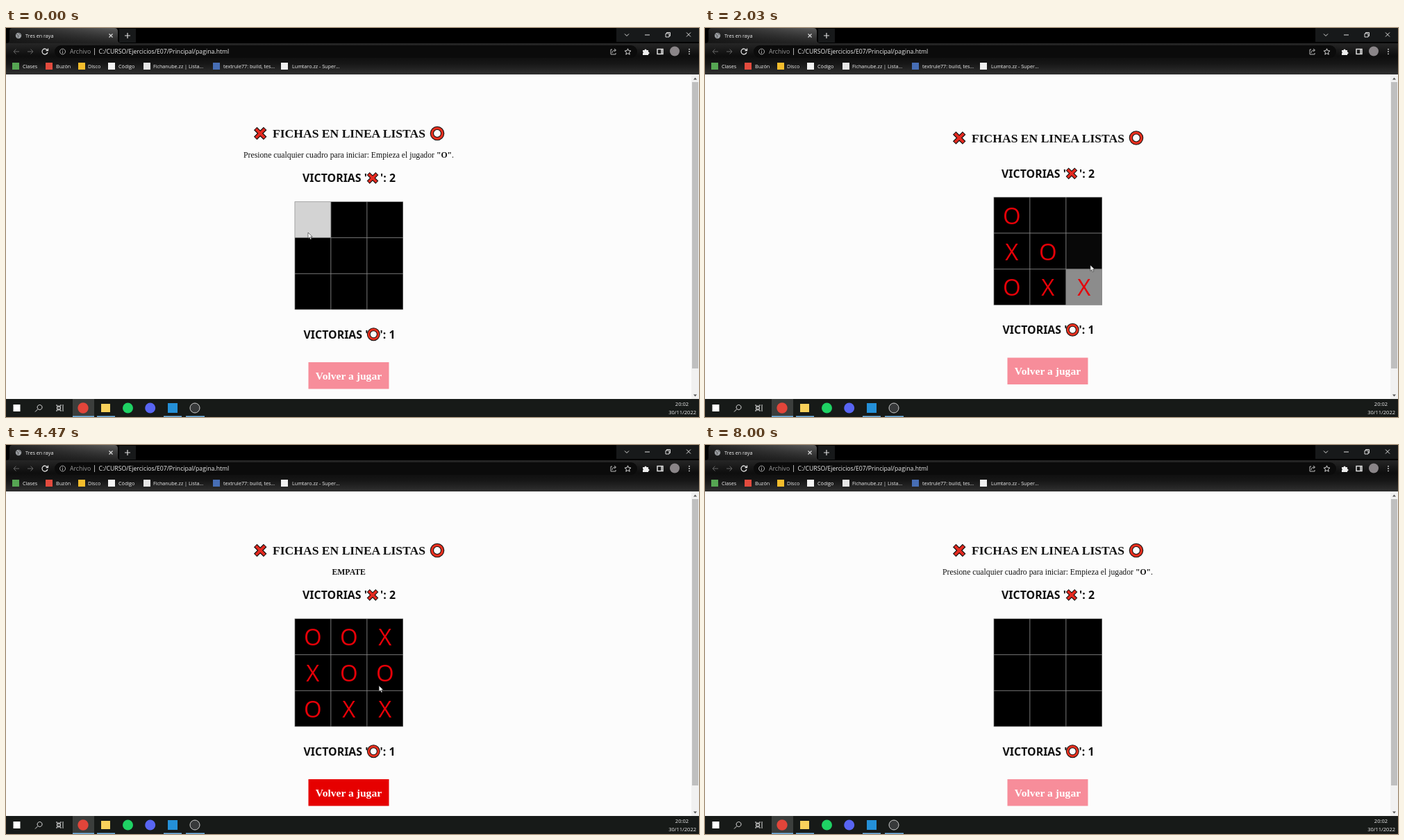
Write an HTML page that moves like this. It is 998 by 561 pixels and loops after 8.03 s.

```html
<!DOCTYPE html>
<html lang="es">
<head>
<meta charset="utf-8">
<title>Tres en raya</title>
<style>
html, body { margin: 0; width: 100%; height: 100%; overflow: hidden; background: #fcfcfc }
svg { display: block; width: 998px; height: 561px }
text { white-space: pre }
.ui { font: 7.2px "Open Sans", "Noto Sans", sans-serif; fill: #eee }
.line { fill: none; stroke: #ddd }
.serif { font: 11.72px "Liberation Serif", serif; fill: #111; text-anchor: middle }
.bold { font-weight: 700 }
.score { font: 700 15.9px "Noto Sans", "Open Sans", sans-serif; fill: #111 }
#board text { font: 33px "Open Sans", "Noto Sans", sans-serif; fill: #e60008; text-anchor: middle }
</style>
</head>
<body>
<svg viewBox="0 0 998 561">
  <defs>
    <linearGradient id="tab"><stop stop-color="#242424"/><stop offset="1" stop-color="#5c5c5c"/></linearGradient>
    <linearGradient id="tabShade" x2="0" y2="1"><stop stop-color="#000" stop-opacity="0"/><stop offset="1" stop-color="#111" stop-opacity=".75"/></linearGradient>
    <linearGradient id="bar" x2="0" y2="1"><stop stop-color="#262626"/><stop offset=".4" stop-color="#0e0e0e"/><stop offset=".65" stop-color="#161616"/><stop offset="1" stop-color="#303030"/></linearGradient>
    <g id="cross" fill="none">
      <path d="M-7-7 7 7M7-7-7 7" stroke="#111" stroke-width="6.4"/>
      <path d="M-6.3-6.3 6.3 6.3M6.3-6.3-6.3 6.3" stroke="#e52a20" stroke-width="4"/>
    </g>
    <g id="ring" fill="none">
      <circle r="7.6" stroke="#111" stroke-width="5.4"/>
      <circle r="7.6" stroke="#e8301f" stroke-width="3.2"/>
    </g>
  </defs>

  <!-- page -->
  <path fill="#fcfcfc" d="M0 67h988v468H0z"/>
  <path fill="#f1f1f1" d="M987 67h11v468h-11z"/>
  <path fill="#bfbfbf" d="M988 78h9v413h-9z"/>
  <path fill="#555" d="M990 74.5l2.5-3 2.5 3zM990 528.5l2.5 3 2.5-3z"/>

  <g id="head">
    <use href="#cross" x="366.2" y="152"/>
    <text class="serif bold" x="494" y="158" style="font-size:17.58px">FICHAS EN LINEA LISTAS</text>
    <use href="#ring" x="621" y="152"/>
  </g>
  <text id="start" class="serif" x="493.5" y="187">Presione cualquier cuadro para iniciar: Empieza el jugador <tspan class="bold">"O"</tspan>.</text>
  <text id="draw" class="serif bold" x="493.7" y="187">EMPATE</text>
  <g id="game">
    <g class="score">
      <text x="427" y="222">VICTORIAS '</text>
      <text x="561" y="222" text-anchor="end">': 2</text>
      <text x="428.5" y="447.5">VICTORIAS '</text>
      <text x="560.5" y="447.5" text-anchor="end">': 1</text>
    </g>
    <use href="#cross" transform="translate(528 216.3) scale(.9)"/>
    <use href="#ring" transform="translate(529.3 441.7) scale(.92)"/>
    <g id="board"><path fill="#858585" d="M415.6 250.2h156.4v156h-156.4z"/></g>
    <path id="button" d="M435.5 482h116v38.5h-116z"/>
    <text class="serif bold" x="493.5" y="506.7" style="font-size:15.6px;fill:#fff">Volver a jugar</text>
  </g>

  <!-- browser -->
  <path d="M0 0h998v67H0z"/>
  <path fill="url(#bar)" d="M0 22h998v45H0z"/>
  <path id="tabShape" fill="url(#tab)" d="M1 22q4 0 4-4V5q0-5 5-5h146q5 0 5 5v13q0 4 4 4z"/>
  <path fill="url(#tabShade)" d="M1 22q4 0 4-4V5q0-5 5-5h146q5 0 5 5v13q0 4 4 4z"/>
  <rect x="70" y="25" width="839" height="18" rx="9" fill="#0b0b0b"/>
  <circle cx="18" cy="11" r="4.2" fill="#9a9da1"/>
  <path class="line" style="stroke:#555" d="M15 9l3 2-1 3M18 7l3 3"/>
  <path fill="#17191a" d="M163 1h24v20h-24zM879 0h119v20H879z"/>
  <g class="line">
    <path stroke-width="1.2" d="M148.500 8.500l5 5m0-5l-5 5M171 11h8m-4-4v8"/>
    <path d="M891 8.500l3 3 3-3M920 10h7M980 6.500l6 6m0-6l-6 6M950 8h5v5h-5zM951.500 8V6.500h5v5H955"/>
    <path stroke="#666" d="M19 34h-8m3.500-3.500L11 34l3.500 3.500M31 34h8m-3.500-3.500L39 34l-3.500 3.500"/>
    <path stroke-width="1.3" d="M59.500 32a4 4 0 1 0 .4 3M60.500 29.500v3h-3"/>
    <path stroke="#aaa" d="M81.500 30a4 4 0 1 0 .1 0M81.500 33.500v3M81.500 31.500v1M127.500 29v10"/>
    <path stroke="#bbb" d="M873 31h-2v7h7v-2M873 36q0-4 5-4m-2-2l2.500 2-2.500 2"/>
    <path d="M895.500 29.800l1.200 2.900 3.200.3-2.400 2.100.7 3.100-2.700-1.600-2.700 1.600.7-3.100-2.400-2.100 3.200-.3z"/>
    <path stroke-width="1.500" d="M938 30.500h8v7h-8zM944 31v6"/>
  </g>
  <path fill="#eee" d="M917 32h2.500a1.500 1.500 0 0 1 3 0h2.500v2.500a1.500 1.500 0 0 1 0 3V39h-8v-2.500a1.500 1.500 0 0 0 0-2.500z"/>
  <circle cx="963" cy="33.500" r="7" fill="#8a8588"/>
  <path stroke="#ddd" stroke-width="1.800" stroke-linecap="round" stroke-dasharray="0 3.300" d="M984 30.700v7"/>
  <g class="ui">
    <text x="28" y="13.500">Tres en raya</text>
    <g style="font-size:8.7px"><text x="92" y="37.200" fill="#999">Archivo</text><text x="133.500" y="37.200">C:/CURSO/Ejercicios/E07/Principal/pagina.html</text></g>
    <g id="marks"></g>
  </g>

  <!-- taskbar -->
  <path fill="#171a18" d="M0 535h998v26H0z"/>
  <path fill="#3b3e3c" d="M96 535h31v26H96z"/>
  <path fill="#76b9ed" d="M96 559.500h31v1.500H96zM131 559.500h26v1.500h-26zM227 559.500h26v1.500h-26zM259 559.500h27v1.500h-27z"/>
  <path fill="#fff" d="M10.500 543h10v10h-10z"/>
  <path class="line" d="M48.500 543.500a3.500 3.500 0 1 0 .1 0M46 549.500l-4 4M73 543v2h6v-2M73 553v-2h6v2M73.500 546.500h5v3h-5zM82 543v10"/>
  <circle cx="111" cy="548" r="7.700" fill="#e2453a"/>
  <path fill="#f8d15b" d="M137 542h13v12h-13z"/>
  <circle cx="175.500" cy="548" r="7.500" fill="#1fd264"/>
  <circle cx="207.700" cy="548" r="7.500" fill="#5865f2"/>
  <path fill="#2490d8" d="M233 541h14v14h-14z"/>
  <circle cx="272" cy="548" r="7" fill="#37393a" stroke="#ccc"/>
  <g class="ui" style="font-size:7.5px" text-anchor="end">
    <text x="983" y="544.500">20:02</text><text x="994" y="556.500">30/11/2022</text>
  </g>

  <g id="pointer" fill="#fff" stroke="#222" stroke-width=".6">
    <path id="arrow" d="M0 0v8.500l2-1.800 1.400 3.200 1.500-.6-1.400-3.200h2.700z"/>
    <path id="hand" d="M-1 1q1-2 2 0v3l4 1q1.500.5 1 2.500l-1 4h-5l-3-4.500q0-1.500 2 0z"/>
  </g>
</svg>
<script>
const $ = id => document.getElementById(id);
const LOOP = 8030, FADE = 300, SHIFT = 6.5;
const FIRST = 200, LAST = 3130, RESET = 5900;

// [time, cell], O and X taking turns
const moves = [[FIRST, 0], [520, 3], [840, 4], [1380, 7], [1600, 6], [1900, 8], [2260, 5], [2580, 2], [LAST, 1]];

// [time, x, y] of the pointer tip
const path = [
  [0, 435, 295], [260, 437, 290], [480, 443, 318], [560, 445, 320], [800, 490, 318], [870, 492, 314],
  [1030, 499, 273], [1200, 498, 288], [1330, 490, 368], [1400, 488, 370], [1560, 445, 372], [1640, 447, 372],
  [1850, 540, 370], [1940, 549, 369], [2030, 555, 342], [2200, 548, 322], [2330, 547, 318], [2520, 538, 275],
  [2770, 534, 289], [2900, 536, 285], [3080, 500, 278], [3200, 500, 278], [3570, 535, 323], [4300, 536, 326],
  [4900, 540, 400], [5300, 552, 495], [5500, 549, 498], [6200, 549, 498], [6900, 620, 600], [LOOP, 620, 600]
];

const marks = [
  [9, "#56a653", "Clases", 24], [57, "#e34b3e", "Buzón", 72], [104, "#f4bd2c", "Disco", 118],
  [147, "#f4f4f4", "Código", 162], [198, "#e6e6e6", "Fichanube.zz | Lista...", 212],
  [298, "#476eb5", "textrule77: build, tes...", 313], [396, "#f0f0f0", "Lumtaro.zz - Super...", 412]
];
$("marks").innerHTML = marks.map(([x, color, name, tx]) =>
  `<rect x="${x}" y="50" width="10" height="10" fill="${color}"/><text x="${tx}" y="57.7">${name}</text>`).join("");

const cells = [...Array(9).keys()].map(i => {
  const g = document.createElementNS("http://www.w3.org/2000/svg", "g");
  g.setAttribute("transform", `translate(${416.3 + i % 3 * 52} ${250.9 + (i / 3 | 0) * 51.9})`);
  g.innerHTML = '<rect width="51.1" height="51"/><text x="25.5" y="38.3"></text>';
  $("board").append(g);
  return g.children;
});

const playing = t => t >= FIRST && t < LAST;

function pointerAt(t) {
  const i = path.findIndex(p => p[0] > t);
  const [t0, x0, y0] = path[i - 1], [t1, x1, y1] = path[i];
  const k = (t - t0) / (t1 - t0);
  return [x0 + (x1 - x0) * k, y0 + (y1 - y0) * k];
}

function hoveredAt(t) {
  if (t >= LAST && t < RESET) return -1;
  const [x, y] = pointerAt(t);
  const col = Math.floor((x - 416) / 52);
  const row = Math.floor((y - 250.5 + (playing(t) ? SHIFT : 0)) / 52);
  return col >= 0 && col < 3 && row >= 0 && row < 3 ? row * 3 + col : -1;
}

// Each cell brightens while hovered and darkens afterwards.
function glowAt(t) {
  const glow = Array(9).fill(0), step = 10;
  glow[0] = 1;
  for (let s = 0; s < t; s += step) {
    const over = hoveredAt(s), d = Math.min(step, t - s) / FADE;
    for (let i = 0; i < 9; i++) glow[i] = Math.max(0, Math.min(1, glow[i] + (i === over ? d : -d)));
  }
  return glow;
}

function render(t) {
  const active = playing(t), over = t >= LAST && t < RESET;
  $("head").setAttribute("transform", `translate(0 ${active ? SHIFT : 0})`);
  $("game").setAttribute("transform", `translate(0 ${active ? -SHIFT : 0})`);
  $("start").style.display = active || over ? "none" : "";
  $("draw").style.display = over ? "" : "none";
  $("button").setAttribute("fill", over ? "#e60000" : "#f78d9a");

  const glow = glowAt(t);
  cells.forEach(([rect, label], i) => {
    const v = Math.round(211 * glow[i]);
    rect.setAttribute("fill", `rgb(${v},${v},${v})`);
    const turn = moves.findIndex(m => m[1] === i);
    label.textContent = t >= moves[turn][0] && t < RESET ? "OX"[turn % 2] : "";
  });

  const [x, y] = pointerAt(t), onButton = over && y > 482;
  $("pointer").setAttribute("transform", `translate(${x} ${y})`);
  $("arrow").style.display = onButton ? "none" : "";
  $("hand").style.display = onButton ? "" : "none";
}

const began = performance.now();
function tick() {
  render((performance.now() - began) % LOOP);
  requestAnimationFrame(tick);
}
tick();
</script>
</body>
</html>
```
